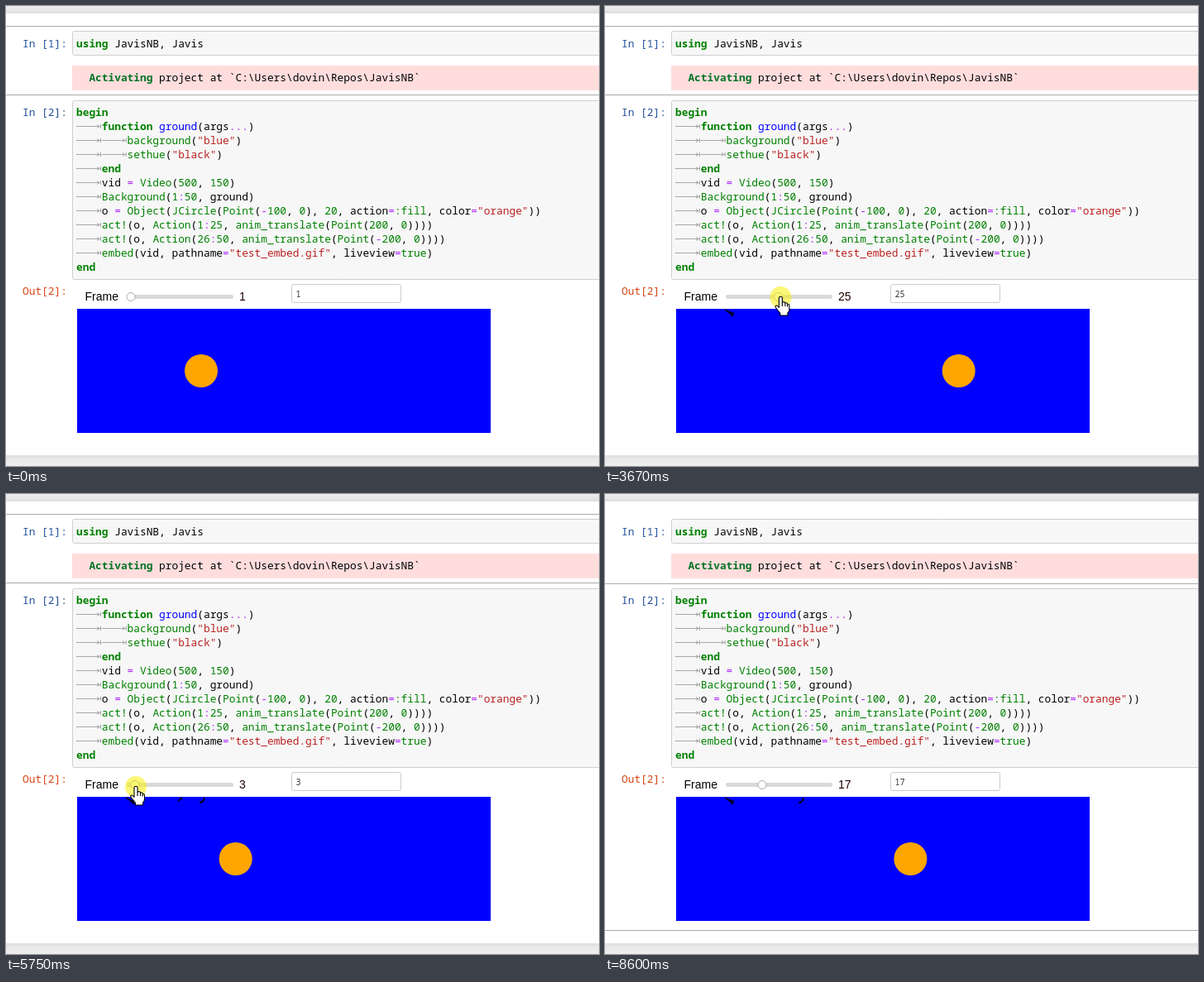
An HTML page with a canvas for the animation above (9590 ms loop, 717 px wide and 556 px high).

```html
<!DOCTYPE html>
<html lang="en">
<head>
<meta charset="utf-8">
<title>Notebook slider</title>
<style>
html, body { margin: 0; width: 100%; height: 100%; overflow: hidden; background: #eee; }
canvas { display: block; width: 717px; height: 556px; }
</style>
</head>
<body>
<canvas id="stage" width="717" height="556"></canvas>
<script>
const W = 717, H = 556, LOOP = 9590, START = 260, STEP = 69.5;
const ctx = document.getElementById('stage').getContext('2d');
const MONO = '"Noto Sans Mono", "DejaVu Sans Mono", monospace';
const SANS = '"Liberation Sans", Arial, sans-serif';
const CODE = '12.83px ' + MONO, CHAR = 7.698;
const GREEN = '#008000', PURPLE = '#aa22ff';
const PRESS = 1990, RELEASE = 8105;

const program = [
  'begin',
  '\tfunction ground(args...)',
  '\t\tbackground("blue")',
  '\t\tsethue("black")',
  '\tend',
  '\tvid = Video(500, 150)',
  '\tBackground(1:50, ground)',
  '\to = Object(JCircle(Point(-100, 0), 20, action=:fill, color="orange"))',
  '\tact!(o, Action(1:25, anim_translate(Point(200, 0))))',
  '\tact!(o, Action(26:50, anim_translate(Point(-200, 0))))',
  '\tembed(vid, pathname="test_embed.gif", liveview=true)',
  'end'
];

// Pointer path: time, x, y
const path = [
  [260, 509, 256], [480, 440, 405], [680, 330, 441], [930, 200, 410],
  [1170, 119, 371], [1380, 130, 366], [1520, 146, 356], [1650, 147, 338],
  [1790, 148, 350], [2000, 151, 353], [2350, 162, 353], [2900, 180.3, 352],
  [2970, 182.8, 352], [3040, 189, 352], [3400, 203, 352], [3740, 215, 352],
  [4100, 234, 352], [4290, 231.5, 352], [4360, 229, 352], [4430, 220, 352],
  [4500, 215, 352], [4570, 207, 353], [4720, 204, 353], [4860, 198, 353],
  [5250, 182, 353], [5610, 163.3, 353], [5680, 156, 354], [5750, 157, 354],
  [5890, 158, 355], [6300, 184, 355], [6650, 214.4, 355], [6720, 219.3, 356],
  [6790, 221.8, 356], [6860, 225, 356], [7070, 226, 357], [7270, 226, 357],
  [7480, 215, 357], [7550, 207, 357], [7900, 190, 357], [8110, 190, 357],
  [8250, 220, 410], [8400, 290, 490], [8560, 356, 562]
];

function pointer(t) {
  const last = path[path.length - 1];
  if (t >= last[0]) return { x: last[1], y: last[2] };
  if (t <= path[0][0]) return { x: path[0][1], y: path[0][2] };
  const i = path.findIndex(p => p[0] > t);
  const a = path[i - 1], b = path[i], u = (t - a[0]) / (b[0] - a[0]);
  return { x: a[1] + (b[1] - a[1]) * u, y: a[2] + (b[2] - a[2]) * u };
}

function sliderValue(t) {
  if (t < PRESS) return 1;
  const x = pointer(Math.min(t, 8000)).x;
  return Math.max(1, Math.min(50, Math.round(1 + (x - 151) / 2.4375)));
}

function ballX(n) {
  return 236 + 200 * (n <= 25 ? n - 1 : 50 - n) / 24;
}

function text(s, x, y, color, font = CODE) {
  ctx.font = font;
  ctx.fillStyle = color;
  ctx.fillText(s, x, y);
}

function rect(x, y, w, h, color) {
  ctx.fillStyle = color;
  ctx.fillRect(x, y, w, h);
}

function box(x, y, w, h, r, fill, stroke) {
  ctx.beginPath();
  ctx.roundRect(x, y, w, h, r);
  ctx.fillStyle = fill;
  ctx.fill();
  if (!stroke) return;
  ctx.strokeStyle = stroke;
  ctx.lineWidth = 1;
  ctx.stroke();
}

function disc(x, y, r, fill) {
  ctx.beginPath();
  ctx.arc(x, y, r, 0, Math.PI * 2);
  ctx.fillStyle = fill;
  ctx.fill();
}

function tabMark(x, y) {
  ctx.strokeStyle = '#a8a8a8';
  ctx.lineWidth = 1;
  ctx.stroke(new Path2D(`M${x} ${y}h29m-4 -2l3 2l-3 2m4.5 -4.5v5`));
}

function tokenColor(s, next, previous) {
  if (/^(begin|function|end|using)$/.test(s)) return GREEN;
  if (s[0] === '"') return '#ba2121';
  if (previous === 'function') return '#0000ff';
  if (/^\d/.test(s) || /^:[a-z]/.test(s) || s === 'true') return GREEN;
  if (/^\w/.test(s) && next === '(') return GREEN;
  return /^(\.\.\.|[=:-])$/.test(s) ? PURPLE : '#000';
}

function codeLine(line, x, y) {
  let word = '';
  const tokens = line.match(/"[^"]*"|:[a-z]+|\w+!?|\.\.\.|[^]/g);
  tokens.forEach((s, i) => {
    if (s === '\t') {
      tabMark(x, y - 4.5);
      x += 4 * CHAR;
      return;
    }
    const bold = /^(begin|function|end|using)$/.test(s) ? 'bold ' : '';
    text(s, x, y, tokenColor(s, tokens[i + 1], word), bold + CODE);
    x += s.length * CHAR;
    if (s !== ' ') word = s;
  });
}

function page(secondSelected) {
  rect(0, 0, W, H, '#eee');
  ctx.save();
  ctx.shadowColor = 'rgba(87,87,87,.2)';
  ctx.shadowBlur = 12;
  rect(-50, 9, W + 100, 534, '#fff');
  ctx.restore();

  for (const y of secondSelected ? [108, 527] : [24, 107]) rect(0, y, W, 1, '#ababab');

  text('In [1]:', 20, 50, '#23509a');
  box(80.5, 30.5, 660, 29, 2, '#f7f7f7', '#cfcfcf');
  codeLine('using JavisNB, Javis', 85, 50);

  rect(80, 72, W, 30, '#ffdddd');
  text('Activating', 85 + 2 * CHAR, 91, '#007427', 'bold ' + CODE);
  text('project at `C:\\Users\\dovin\\Repos\\JavisNB`', 85 + 13 * CHAR, 91, '#000');

  text('In [2]:', 20, 133, '#23509a');
  box(80.5, 114.5, 660, 216, 2, '#f7f7f7', '#cfcfcf');
  program.forEach((line, i) => codeLine(line, 85, 133 + 17 * i));
  text('Out[2]:', 20, 349, '#d84315');
}

function widget(value, shown) {
  text('Frame', 95.5, 356, '#000', '14px ' + SANS);
  box(146, 349, 129, 5, 2.5, '#d9d9d9');
  box(146 + (value - 1) * 2.4375, 346.5, 10, 10, 5, '#fff', '#aaa');
  text(value, 282, 356, '#200000', '14px ' + SANS);
  box(345.5, 336.5, 132, 22, 2, '#fff', '#ccc');
  text(value, 350.5, 352, '#333', '10px ' + MONO);
  rect(86, 366, 500, 150, '#0000ff');
  disc(ballX(shown), 441, 20, '#ffa500');
}

// Dark traces the pointer leaves along the top of the video
function traces(t) {
  ctx.strokeStyle = '#00001c';
  ctx.lineWidth = 2;
  if (t > 2400) ctx.stroke(new Path2D('M145 367l5 3l5 5m-5 -5l6 2'));
  if (t > 4250) ctx.stroke(new Path2D('M234 373q5 0 6 -6'));
  if (t > 4600 && t < 6200) ctx.stroke(new Path2D('M208 371l5 -4'));
}

const arrow = new Path2D('M0 0V16.5L3.8 13L6.5 19L9.2 17.8L6.6 12H12Z');
const hand = new Path2D('M-2 1Q-2 -.7 0 -.7T2 1V6Q5 5 5.5 7Q8 6.2 8.2 8.2Q10.5 8 10.5 10.5V15Q10.5 17.5 8.5 19V22H-.5V19.5Q-2 17.5 -6 12.5Q-6.8 10 -5 10Q-3.7 10 -2 12.3Z');
const knuckles = new Path2D('M2 6V11M5.5 7V11M8.2 8.2V11.5');

function drawPointer(t) {
  const { x, y } = pointer(t);
  if (t >= PRESS && t < RELEASE) disc(x, y, 13, 'rgba(250,240,20,.58)');
  const pointing = t > 1640 && t < 8150;
  const shape = pointing ? hand : arrow;
  ctx.save();
  ctx.translate(x, y);
  ctx.lineWidth = 1.1;
  ctx.lineJoin = 'round';
  ctx.fillStyle = '#fff';
  ctx.strokeStyle = '#000';
  ctx.fill(shape);
  ctx.stroke(shape);
  if (pointing) ctx.stroke(knuckles);
  ctx.restore();
}

function draw(time) {
  const tick = Math.floor((time - START) / STEP + 0.1);
  const t = START + tick * STEP;
  page(t >= RELEASE);
  // The widget trails the pointer by one tick, the video by two
  widget(sliderValue(t - STEP), sliderValue(t - 2 * STEP));
  traces(t);
  if (tick >= 0 && t < 8580) drawPointer(t);
}

const began = performance.now();
function loop() {
  draw((performance.now() - began) % LOOP);
  requestAnimationFrame(loop);
}
loop();
</script>
</body>
</html>
```
